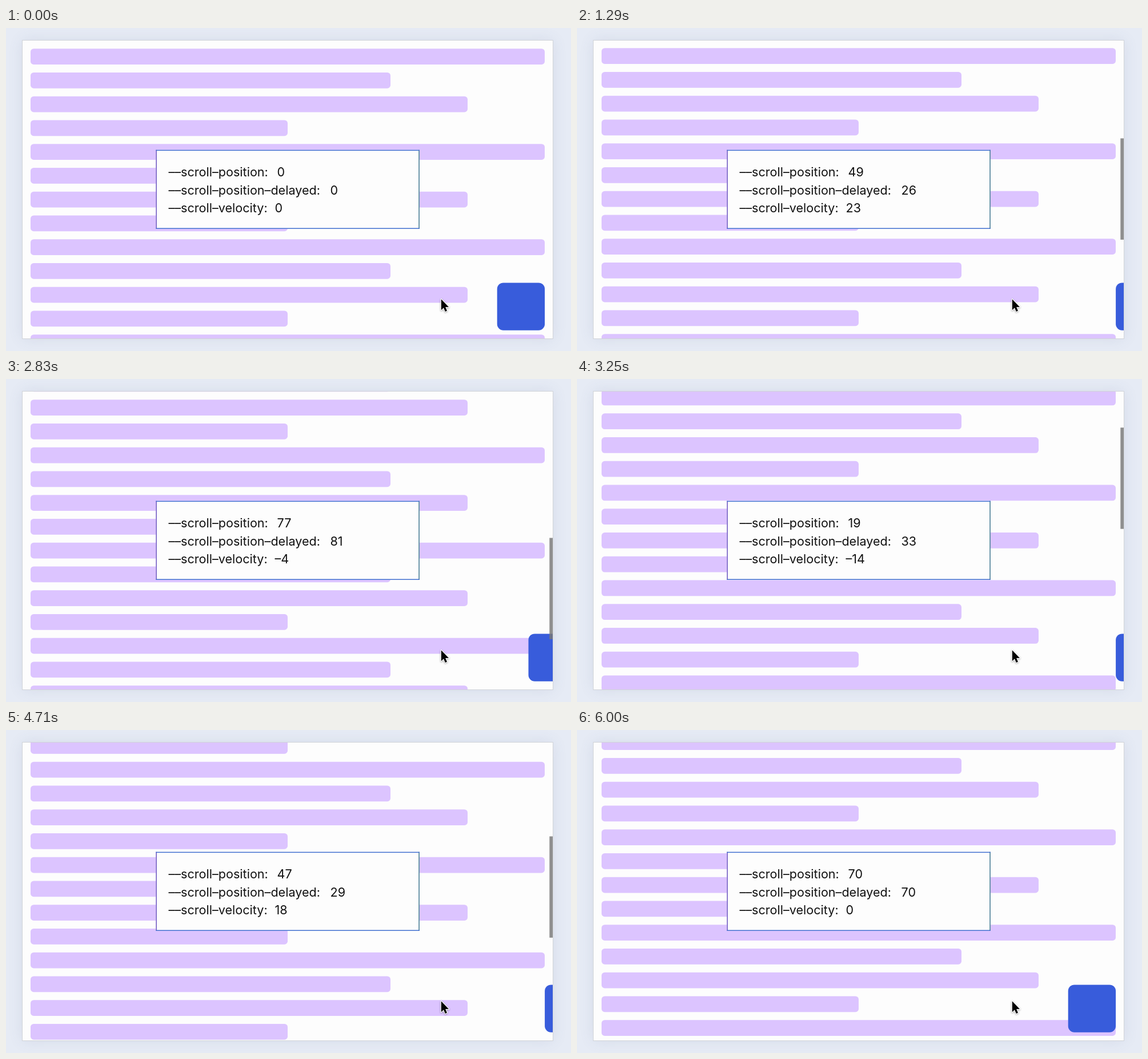
Recreate the animation shown at these times as an HTML page with a canvas. Size 989 px wide and 566 px high, loop 6040 ms.

```html
<!DOCTYPE html>
<html lang="en">
<head>
<meta charset="utf-8">
<title>Scroll velocity</title>
<style>
html, body { margin: 0; width: 100%; height: 100%; overflow: hidden; background: #e6ebf5; }
canvas { display: block; width: 989px; height: 566px; }
</style>
</head>
<body>
<canvas id="stage"></canvas>
<script>
const W = 989, H = 566, LOOP = 6040, STEP = 5;
const canvas = document.getElementById('stage');
const ctx = canvas.getContext('2d');
const dpr = window.devicePixelRatio || 1;
canvas.width = W * dpr;
canvas.height = H * dpr;

const view = { x: 29, y: 22, w: 928, h: 522 };
const rowWidths = [900, 630, 765, 450];
const ROWS = 36, PITCH = 41.75, RANGE = 1000;

// [start, end, scroll target, power]; a negative power eases out
const moves = [
  [540, 1290, 502, 4],
  [1290, 1870, 821, -3],
  [2760, 2830, 751.5, 3],
  [2830, 3616, 121, -3],
  [4440, 4710, 481.5, 1.4],
  [4710, 5460, 697, -5]
];

const clamp = v => Math.max(0, Math.min(1, v));
const easeOut = (u, k) => 1 - Math.pow(1 - u, k);

function scrollAt(t) {
  let pos = 0;
  for (const [start, end, target, k] of moves) {
    if (t <= start) break;
    const u = clamp((t - start) / (end - start));
    pos += (target - pos) * (k > 0 ? Math.pow(u, k) : easeOut(u, -k));
  }
  return pos;
}

// The delayed value chases the position; the tile and scrollbar react to it.
function simulate() {
  const LAG = 6, DELAY = 150, SLIDE = 100, HOLD = 430, FADE = 240;
  const states = [];
  let delayed = 0, tile = 0, from = 0, goal = 0, since = -SLIDE, moved = -1e4;
  for (let t = 0; t <= LOOP; t += STEP) {
    const scroll = scrollAt(t);
    const position = scrollAt(t - LAG) / RANGE * 100;
    delayed += (position - delayed) * (1 - Math.exp(-STEP / DELAY));
    if (Math.abs(scroll - scrollAt(t - STEP)) > 0.05) moved = t;
    const next = Math.abs(position - delayed) >= 0.5 ? 1 : 0;
    if (next !== goal) {
      goal = next;
      from = tile;
      since = t;
    }
    tile = from + (goal - from) * easeOut(clamp((t - since) / SLIDE), 3);
    const thumb = 1 - clamp((t - moved - HOLD) / FADE);
    states.push({ scroll, position, delayed, tile, thumb });
  }
  return states;
}
const states = simulate();

function roundRect(x, y, w, h, r, color) {
  ctx.fillStyle = color;
  ctx.beginPath();
  ctx.roundRect(x, y, w, h, r);
  ctx.fill();
}

function rect(x, y, w, h, color) {
  ctx.fillStyle = color;
  ctx.fillRect(x, y, w, h);
}

function drawPage() {
  rect(0, 0, W, H, '#e6ebf5');
  ctx.save();
  ctx.shadowColor = 'rgba(80, 100, 140, 0.12)';
  ctx.shadowBlur = 24 * dpr;
  rect(view.x, view.y, view.w, view.h, '#fdfdfd');
  ctx.restore();
}

function drawView({ scroll, tile, thumb }) {
  ctx.save();
  ctx.beginPath();
  ctx.rect(view.x, view.y, view.w, view.h);
  ctx.clip();
  for (let i = 0; i < ROWS; i++) {
    const y = 36.2 + i * PITCH - scroll;
    if (y > -30 && y < H) roundRect(43, y, rowWidths[i % 4], 27.7, 5.5, '#dcc4ff');
  }
  roundRect(859.7 + tile * 83.4, 446.4, 83.4, 83.4, 11, '#385cdb');
  if (thumb > 0) {
    rect(951.3, 22.2 + scroll * 0.341, 6, 177.5, `rgba(120, 120, 120, ${0.82 * thumb})`);
  }
  ctx.restore();
  ctx.strokeStyle = '#d0d3d8';
  ctx.lineWidth = 1;
  ctx.strokeRect(view.x - 0.5, view.y - 0.5, view.w + 1, view.h + 1);
}

function drawLine(name, value, valueX, y) {
  const dashed = s => String(s).replace(/-/g, '\u2013');
  ctx.fillText(dashed(name), 284.5, y);
  ctx.fillText(dashed(value), valueX, y);
}

function drawReadout({ position, delayed }) {
  const x = 262.4, y = 213.6, w = 461.4, h = 138.4, b = 1.5;
  rect(x, y, w, h, '#fdfdfd');
  rect(x, y, b, h, '#6a52bf');
  rect(x + w - b, y, b, h, '#3d7590');
  rect(x, y, w, b, '#416fd0');
  rect(x, y + h - b, w, b, '#416fd0');

  const p = Math.round(position), d = Math.round(delayed);
  ctx.font = '400 21.6px Inter, "Open Sans", sans-serif';
  ctx.fillStyle = '#111';
  ctx.textBaseline = 'alphabetic';
  drawLine('--scroll-position:', p, 474.5, 260.3);
  drawLine('--scroll-position-delayed:', d, 567.5, 291.6);
  drawLine('--scroll-velocity:', p - d, 470.5, 322.9);
}

function drawPointer() {
  const arrow = new Path2D('M761.8 475.3V494.2L766 490.3L768.8 496.9L772 495.5L769.2 489H775Z');
  ctx.save();
  ctx.shadowColor = 'rgba(0, 0, 0, 0.35)';
  ctx.shadowBlur = 3 * dpr;
  ctx.shadowOffsetY = dpr;
  ctx.lineJoin = 'round';
  ctx.lineWidth = 2.4;
  ctx.strokeStyle = '#fff';
  ctx.stroke(arrow);
  ctx.restore();
  ctx.fillStyle = '#000';
  ctx.fill(arrow);
}

const started = performance.now();

function draw() {
  const t = (performance.now() - started) % LOOP;
  const state = states[Math.floor(t / STEP)];
  ctx.setTransform(dpr, 0, 0, dpr, 0, 0);
  drawPage();
  drawView(state);
  drawReadout(state);
  drawPointer();
  requestAnimationFrame(draw);
}
draw();
</script>
</body>
</html>
```
